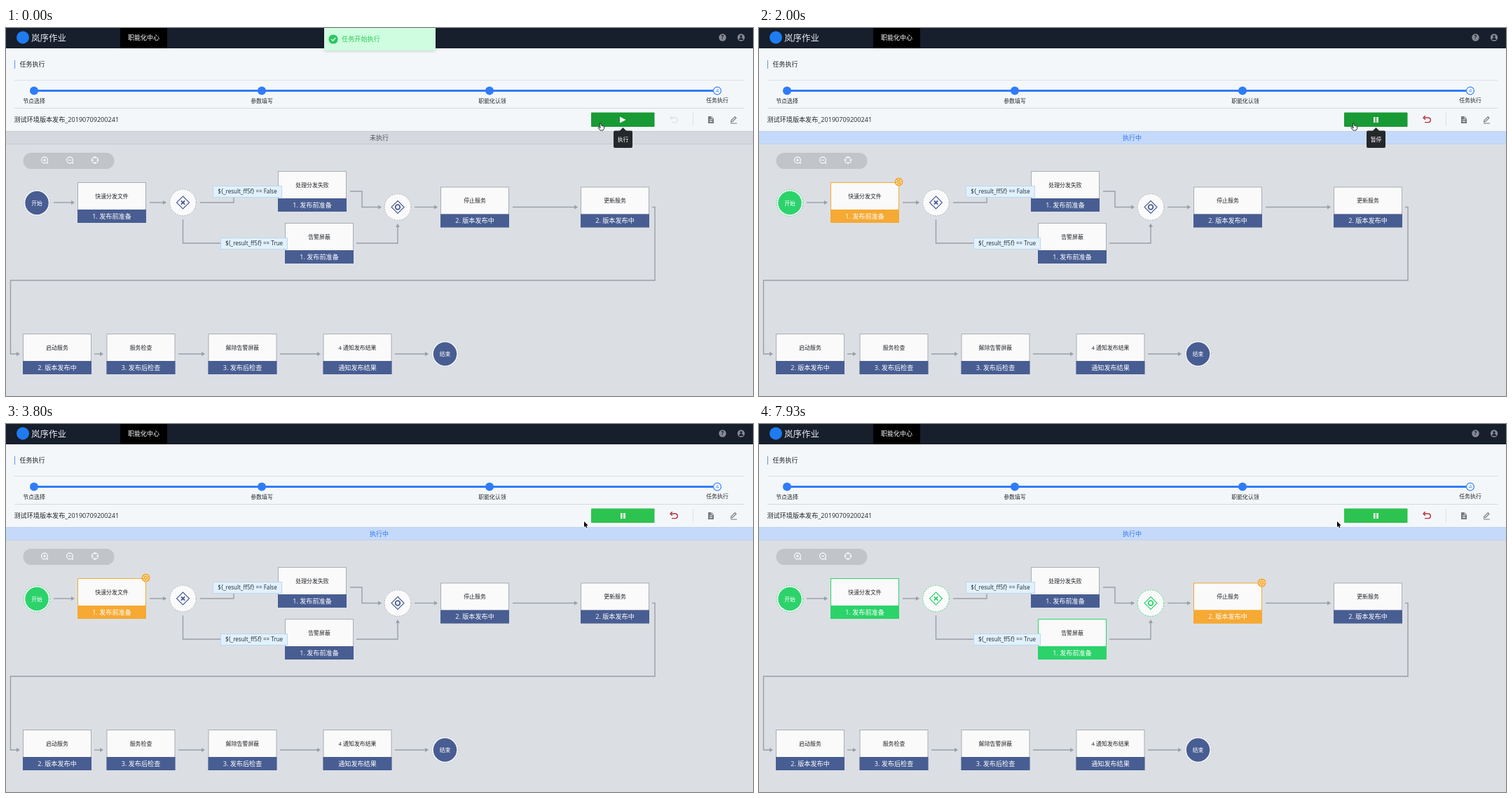
An HTML page with a canvas for the animation above (8 s loop, 1066 by 525 pixels).

```html
<!DOCTYPE html>
<html lang="zh">
<head>
<meta charset="utf-8">
<title>任务执行</title>
<style>
html, body { margin: 0; width: 100%; height: 100%; overflow: hidden; background: #dbdfe4; }
canvas { display: block; width: 1066px; height: 525px; }
</style>
</head>
<body>
<canvas id="stage"></canvas>
<script>
const W = 1066, H = 525, LOOP = 8000;
const FONT = '"Open Sans", "Noto Sans", "Noto Sans CJK SC", "Noto Sans CJK", sans-serif';
const BLUE = '#2f7cfb', NAVY = '#485d92', GREEN = '#2cd36b', ORANGE = '#f6a933';
const LINE = '#9a9fa7', WHITE = '#fafafa', TEXT = '#23262b';
// Moments when the run moves on
const RUN = 600, LEAVE = 870, MOVE = 2530, DONE = 4400, NEXT = 6670;

const canvas = document.getElementById('stage');
const c = canvas.getContext('2d');
const dpr = window.devicePixelRatio || 1;
canvas.width = W * dpr;
canvas.height = H * dpr;

const clamp = v => Math.max(0, Math.min(1, v));
const smooth = v => v * v * (3 - 2 * v);

function rect(x, y, w, h, color) {
  c.fillStyle = color;
  c.fillRect(x, y, w, h);
}

function round(x, y, w, h, r, color) {
  c.beginPath();
  c.roundRect(x, y, w, h, r);
  c.fillStyle = color;
  c.fill();
}

function text(s, x, y, size, color, align = 'center', weight = 400) {
  c.font = `${weight} ${size}px ${FONT}`;
  c.textAlign = align;
  c.fillStyle = color;
  c.fillText(s, x, y + size * 0.37);
}

function path(points, color, width = 1, close = false) {
  c.beginPath();
  points.forEach(([x, y]) => c.lineTo(x, y));
  if (close) c.closePath();
  c.strokeStyle = color;
  c.lineWidth = width;
  c.stroke();
}

function shape(points, color) {
  c.beginPath();
  points.forEach(([x, y]) => c.lineTo(x, y));
  c.closePath();
  c.fillStyle = color;
  c.fill();
}

function disc(x, y, r, color) {
  c.beginPath();
  c.arc(x, y, r, 0, Math.PI * 2);
  c.fillStyle = color;
  c.fill();
}

function ring(x, y, r, color, width = 1, dash = []) {
  c.beginPath();
  c.arc(x, y, r, 0, Math.PI * 2);
  c.setLineDash(dash);
  c.strokeStyle = color;
  c.lineWidth = width;
  c.stroke();
  c.setLineDash([]);
}

function at(x, y, draw) {
  c.save();
  c.translate(x, y);
  draw();
  c.restore();
}

function wire(points) {
  path(points, LINE, 1.4);
  const [x, y] = points[points.length - 1];
  const [px, py] = points[points.length - 2];
  at(x, y, () => {
    c.rotate(Math.atan2(y - py, x - px));
    shape([[1, 0], [-4, -3], [-4, 3]], LINE);
  });
}

function header() {
  rect(0, 0, W, 29, '#171e2c');
  rect(163, 0, 67, 29, '#000');
  disc(24, 13.5, 9, '#1f7cf0');
  text('岚序作业', 36, 14, 12.5, '#e9edf3', 'left');
  text('职能化中心', 196.5, 14, 9, '#fff', 'center', 500);
  disc(1022.5, 13.5, 5.2, '#858a94');
  text('?', 1022.5, 13.5, 8, '#171e2c', 'center', 700);
  disc(1049, 13.5, 5.2, '#858a94');
  disc(1049, 12, 1.7, '#171e2c');
  c.beginPath();
  c.arc(1049, 17, 3, Math.PI, 0);
  c.fill();
}

function steps() {
  rect(0, 29, W, 118, '#f4f7f9');
  rect(12, 46, 1, 12, '#5b92e8');
  text('任务执行', 19.5, 52, 9, TEXT, 'left', 500);
  rect(12, 74, 1042, 1, '#dce0e6');
  rect(12, 114, 1042, 1, '#d5d9df');
  rect(40, 88, 969, 3, BLUE);
  [40, 365, 690].forEach(x => disc(x, 89.5, 6, BLUE));
  disc(1015, 89.5, 6, '#fff');
  ring(1015, 89.5, 5.4, BLUE, 1.2);
  text('4', 1015, 89.5, 8, BLUE);
  text('节点选择', 40, 104, 7.9, TEXT);
  text('参数填写', 365, 104, 7.9, TEXT);
  text('职能化认领', 694, 104, 7.9, TEXT);
  text('任务执行', 1015, 103, 7.9, TEXT);
  text('测试环境版本发布_20190709200241', 11.5, 130.5, 9.1, TEXT, 'left');
}

function undo(color) {
  at(953, 130.5, () => {
    c.beginPath();
    c.moveTo(-5, -2.5);
    c.lineTo(2, -2.5);
    c.arc(2, 0.8, 3.3, -Math.PI / 2, Math.PI / 2);
    c.lineTo(-3, 4.1);
    c.strokeStyle = color;
    c.lineWidth = 1.4;
    c.stroke();
    path([[-2.2, -5.3], [-5, -2.5], [-2.2, 0.3]], color, 1.4);
  });
}

function toolbar(running, hover) {
  round(835, 120.5, 90.5, 20.5, 1, hover ? '#189a34' : '#2dc350');
  if (running) {
    rect(877, 127, 2.6, 8, '#fff');
    rect(881.2, 127, 2.6, 8, '#fff');
  } else {
    shape([[876, 126.5], [884.5, 131], [876, 135.5]], '#fff');
  }
  undo(running ? '#b5323f' : '#dfe3e8');
  rect(980, 121, 1, 19, '#dde1e6');
  shape([[1002, 126], [1007, 126], [1010, 129], [1010, 136], [1002, 136]], '#75797f');
  path([[1004, 131], [1008, 131]], '#f4f7f9');
  path([[1004, 133.5], [1008, 133.5]], '#f4f7f9');
  path([[1007, 126], [1007, 129], [1010, 129]], '#f4f7f9', 0.8);
  path([[1034.5, 134], [1035, 131.8], [1040.3, 126.5], [1042, 128.2], [1036.7, 133.5]], '#75797f', 1.1, true);
  path([[1034, 136], [1043, 136]], '#75797f');
}

function status(running) {
  rect(0, 147, W, 18.5, running ? '#c5dafa' : '#d5d8de');
  rect(0, 147, W, 1, running ? '#bdd2f3' : '#c9cdd4');
  rect(0, 165, W, 1, running ? '#bfd0ea' : '#c6cad1');
  text(running ? '执行中' : '未执行', 532.5, 156.5, 9, running ? '#2f74f2' : '#50545b');
}

function zoomBar() {
  round(24.5, 178, 130, 23, 11.5, '#c1c4c8');
  [55, 91, 127].forEach((x, i) => {
    ring(x, 188.5, 4.4, '#fff', 1.1);
    if (i < 2) {
      path([[x + 3, 191.5], [x + 5, 193.5]], '#fff', 1.2);
      path([[x - 2, 188.5], [x + 2, 188.5]], '#fff', 1.1);
    }
    if (i === 0) path([[x, 186.5], [x, 190.5]], '#fff', 1.1);
    if (i === 2) {
      for (let k = 0; k < 4; k++) at(x, 188.5, () => {
        c.rotate(k * Math.PI / 2);
        path([[2.2, 0], [5.2, 0]], '#fff', 1.1);
      });
    }
  });
}

function node(x, y, title, phase, color = NAVY) {
  rect(x, y, 98, 58, color === NAVY ? '#a9adb4' : color);
  rect(x + 1, y + 1, 96, 38, WHITE);
  rect(x, y + 39, 98, 19, color);
  text(title, x + 49, y + 20, 7.9, TEXT);
  text(phase, x + 49, y + 48.5, 9.1, '#fff');
}

function terminal(x, y, label, color) {
  disc(x, y, 19, '#f2f4f6');
  ring(x, y, 18.8, color === NAVY ? '#b2b8c4' : color, 0.8, [2, 1.6]);
  disc(x, y, 16.7, color);
  text(label, x, y + 0.5, 7.8, '#fff');
}

function gateway(x, y, color, cross) {
  disc(x, y, 19, WHITE);
  ring(x, y, 18.8, color === NAVY ? '#a4a8b0' : color, 0.9, [2, 1.6]);
  path([[x, y - 9], [x + 9, y], [x, y + 9], [x - 9, y]], color, 1.1, true);
  if (cross) {
    path([[x - 2.6, y - 2.6], [x + 2.6, y + 2.6]], color, 2);
    path([[x + 2.6, y - 2.6], [x - 2.6, y + 2.6]], color, 2);
  } else {
    ring(x, y, 3.3, color, 1.8);
  }
}

function branch(x, y, w, value) {
  rect(x, y, w, 17, '#b9d8ee');
  rect(x + 1, y + 1, w - 2, 15, '#e1f1fd');
  text('${_result_ff5f} == ' + value, x + w / 2, y + 8.5, 8.05, '#23282e');
}

function gear(x, y, t) {
  at(x, y, () => {
    c.rotate(t / 1000 * Math.PI * 2);
    disc(0, 0, 6, ORANGE);
    ring(0, 0, 3.5, '#fbe7c4', 1.7, [2.2, 1.465]);
    disc(0, 0, 1.1, '#fbe7c4');
  });
}

function flow(t) {
  const start = t < RUN ? NAVY : GREEN;
  const first = t < RUN ? NAVY : t < DONE ? ORANGE : GREEN;
  const passed = t < NEXT ? NAVY : GREEN;
  const stop = t < NEXT ? NAVY : ORANGE;
  const prep = '1. 发布前准备', live = '2. 版本发布中', check = '3. 发布后检查';

  [[68, 97, 249], [205, 228, 249], [583, 615, 255.5], [723, 815, 255.5],
   [126, 138, 465], [246, 283, 465], [391, 448, 465], [555, 602, 465]]
    .forEach(([a, b, y]) => wire([[a, y], [b, y]]));
  path([[277, 249], [325, 249], [325, 233], [388, 233]], LINE, 1.4);
  path([[252.5, 273], [252.5, 307], [398, 307]], LINE, 1.4);
  wire([[491, 233], [508, 233], [508, 255.5], [535, 255.5]]);
  wire([[500, 307], [559, 307], [559, 280]]);
  wire([[922, 255.5], [926, 255.5], [926, 360], [6.5, 360], [6.5, 465], [19, 465]]);

  terminal(44, 249.5, '开始', start);
  terminal(626.5, 465, '结束', NAVY);
  gateway(252.5, 249, passed, true);
  gateway(559, 255.5, passed, false);
  node(102, 220, '快速分发文件', prep, first);
  node(388, 204, '处理分发失败', prep);
  node(398, 278, '告警屏蔽', prep, passed);
  node(620, 226.5, '停止服务', live, stop);
  node(820, 226.5, '更新服务', live);
  node(24, 436, '启动服务', live);
  node(143.5, 436, '服务检查', check);
  node(288.5, 436, '解除告警屏蔽', check);
  node(452.5, 436, '4 通知发布结果', '通知发布结果');
  branch(295, 225, 99, 'False');
  branch(306, 299, 96, 'True');
  if (first === ORANGE) gear(199.5, 219.5, t);
  if (stop === ORANGE) gear(717.5, 226.5, t);
}

function toast(t) {
  const p = clamp((t - LEAVE) / 300);
  if (p === 1) return;
  c.save();
  c.globalAlpha = 1 - p * 0.75;
  c.translate(0, -34 * smooth(p));
  c.shadowColor = 'rgba(0,0,0,.18)';
  c.shadowBlur = 4 * dpr;
  c.shadowOffsetY = dpr;
  round(454, -2, 159, 34, 2, '#cffde0');
  c.shadowColor = 'transparent';
  disc(467, 16, 6.6, '#2dc561');
  path([[464, 16], [466.4, 18.3], [470.2, 14]], '#e8fff0', 1.2);
  text('任务开始执行', 479, 16, 9.15, '#2dcb57', 'left', 500);
  c.restore();
}

function tip(label) {
  shape([[880.5, 142], [886, 147.5], [875, 147.5]], '#25282b');
  round(867, 146.5, 27, 24.5, 2, '#25282b');
  text(label, 880.5, 159, 7.8, '#fff');
}

function pointer(t, hover) {
  const p = smooth(clamp((t - MOVE) / 270));
  at(849 - 24 * p, 136 + 3 * p, () => {
    c.lineJoin = 'round';
    if (hover) {
      const hand = [[-1.5, 0], [0, 0], [1, 3.5], [3.5, 3.8], [4.5, 5],
        [4.5, 7.5], [3, 10], [-1, 10], [-4, 6.3], [-2.8, 5.5], [-1, 7]];
      shape(hand, '#fff');
      path(hand, '#15191c', 0.9, true);
    } else {
      const arrow = [[0, 0], [0, 8], [1.8, 6.4], [3, 9.2], [4.4, 8.6], [3.2, 5.9], [5.6, 5.7]];
      path(arrow, '#fff', 1.3, true);
      shape(arrow, '#000');
    }
  });
}

function draw(t) {
  const running = t >= RUN, hover = t < MOVE + 130;
  c.setTransform(dpr, 0, 0, dpr, 0, 0);
  rect(0, 0, W, H, '#dbdfe4');
  header();
  steps();
  toolbar(running, hover);
  status(running);
  zoomBar();
  flow(t);
  toast(t);
  if (hover) tip(running ? '暂停' : '执行');
  pointer(t, hover);
}

const begin = performance.now();
function tick() {
  draw((performance.now() - begin) % LOOP);
  requestAnimationFrame(tick);
}
tick();
</script>
</body>
</html>
```
